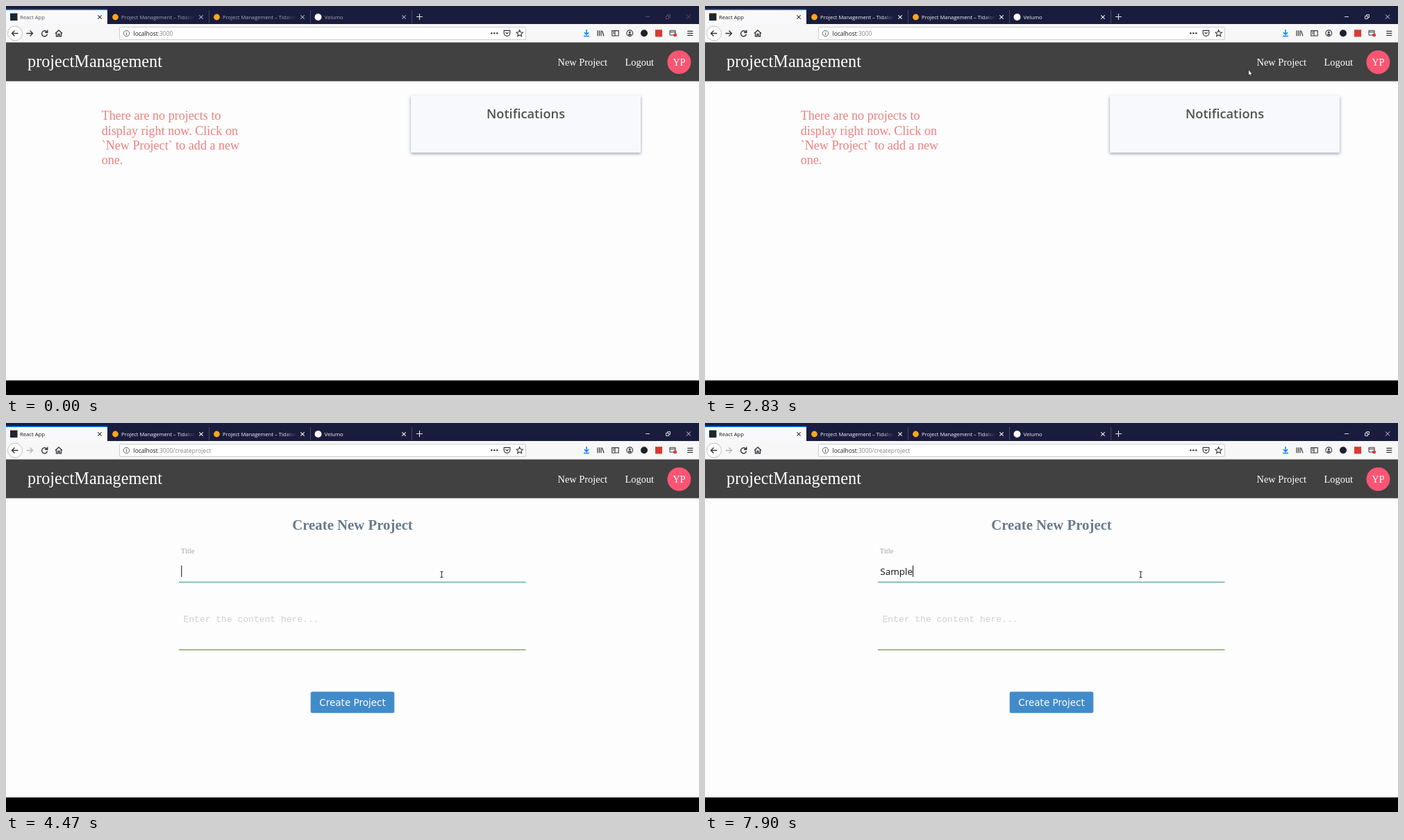
An HTML page with a canvas that plays this animation: 998x561 px, repeating every 8000 ms.

```html
<!DOCTYPE html>
<html lang="en">
<head>
<meta charset="utf-8">
<title>Project management demo</title>
<style>
  html, body { margin: 0; width: 100%; height: 100%; overflow: hidden; background: #000; }
  canvas { display: block; }
</style>
</head>
<body>
<canvas id="stage" width="998" height="561"></canvas>
<script>
const ctx = document.getElementById('stage').getContext('2d');
const LOOP = 8000;
const SERIF = '"Liberation Serif", serif';
const UI = '"Open Sans", sans-serif';
const MONO = '"Liberation Mono", monospace';
const WIDE = '"DejaVu Sans", sans-serif';

// Moments of the story, in ms
const ACTIVATE = 1340, HOVER = 2850, OPEN_FORM = 3240, LEAVE_LINK = 3590, FOCUS = 4100;
const TYPED = [6900, 7070, 7200, 7350, 7590, 7830];
const POINTER = [
  [1340, 640, 238], [1600, 574, 126], [1800, 574, 126], [1970, 406, 125], [2100, 406, 125],
  [2130, 418, 121], [2500, 610, 112], [2900, 818, 87], [3530, 818, 87],
  [3700, 718, 165], [3830, 637.5, 220], [4060, 627.5, 218.5]
];

const clamp = v => Math.max(0, Math.min(1, v));
const mix = (a, b, k) => a + (b - a) * k;
const ease = k => k * k * (3 - 2 * k);

function rect(x, y, w, h, color) {
  ctx.fillStyle = color;
  ctx.fillRect(x, y, w, h);
}

function rounded(x, y, w, h, r, fill, stroke) {
  ctx.beginPath();
  ctx.roundRect(x, y, w, h, r);
  if (fill) { ctx.fillStyle = fill; ctx.fill(); }
  if (stroke) { ctx.strokeStyle = stroke; ctx.lineWidth = 1; ctx.stroke(); }
}

function disc(x, y, r, fill, stroke, width = 1) {
  ctx.beginPath();
  ctx.arc(x, y, r, 0, Math.PI * 2);
  if (fill) { ctx.fillStyle = fill; ctx.fill(); }
  if (stroke) { ctx.strokeStyle = stroke; ctx.lineWidth = width; ctx.stroke(); }
}

function text(str, x, y, size, family, color, weight = 400, align = 'left') {
  ctx.font = `${weight} ${size}px ${family}`;
  ctx.fillStyle = color;
  ctx.textAlign = align;
  ctx.fillText(str, x, y);
  return ctx.measureText(str).width;
}

function stroke(path, x, y, color, width = 1.1) {
  ctx.save();
  ctx.translate(x, y);
  ctx.strokeStyle = color;
  ctx.lineWidth = width;
  ctx.stroke(new Path2D(path));
  ctx.restore();
}

function tabBar(active) {
  const ink = active ? '#f4f4fa' : '#a3a4b4';
  const control = active ? '#e8e8f0' : '#55576e';
  rect(0, 0, 998, 26, '#1a1c3d');
  rect(0, 5, 146, 21, '#f9f9fb');
  rect(0, 4.5, 146, 1.5, '#0a84ff');
  rect(6, 10.5, 10.5, 10.5, '#20262d');
  text('React App', 20, 18.7, 7.7, UI, active ? '#17171c' : '#55555c');
  for (const x of [146, 292]) {
    disc(x + 11.5, 16, 4.4, '#ffa51f');
    ctx.save();
    ctx.beginPath();
    ctx.rect(x, 6, 127, 20);
    ctx.clip();
    const fade = ctx.createLinearGradient(x + 108, 0, x + 127, 0);
    fade.addColorStop(0, ink);
    fade.addColorStop(1, '#1a1c3d');
    text('Project Management – Tidalora', x + 20, 18.7, 7.55, UI, fade);
    ctx.restore();
  }
  disc(449.5, 16, 5, '#ffffff');
  text('Velumo', 458.5, 18.7, 7.7, UI, ink);
  for (const x of [292, 438, 584]) rect(x, 6, 1, 19, '#44465f');
  [135, 281, 427, 573].forEach((x, i) =>
    stroke('M-2.7-2.7L2.7 2.7M2.7-2.7L-2.7 2.7', x, 16, i ? ink : '#333338'));
  stroke('M-4.5 0H4.5M0-4.5V4.5', 595.5, 15.5, '#e4e4ec');
  stroke('M-3 0H3', 924, 15.5, control, 0.9);
  stroke('M-3-1H1V3H-3ZM-1-1V-3H3V1H1', 953.5, 15.5, control, 0.9);
  stroke('M-3-3L3 3M3-3L-3 3', 983, 15.5, control, 0.9);
}

function toolbar(formOpen) {
  const ink = '#38383d';
  const arrow = 'M4.5 0H-4.5M-.5-4L-4.5 0L-.5 4';
  rect(0, 26, 998, 26.5, '#f7f7f8');
  disc(13, 39.5, 10.5, '#fdfdfd', '#bcbcc0', 0.9);
  stroke(arrow, 13, 39.5, ink, 1.4);
  ctx.save();
  ctx.scale(-1, 1);
  stroke(arrow, -34, 39.5, formOpen ? '#b8b8bc' : ink, 1.4);
  ctx.restore();
  stroke('M3.4-2A4 4 0 1 0 4 1M4.3-5V-1.2H.5', 55.5, 39.5, ink, 1.4);
  stroke('M-5 0L0-4.5L5 0M-3.5-1V4.2H-1V1H1V4.2H3.5V-1', 76, 39.5, ink, 1.4);

  rounded(163.5, 30.5, 585, 18, 1.5, '#ffffff', '#cfcfd2');
  disc(173.5, 39.5, 4.2, null, '#55555a', 0.9);
  stroke('M0-2.4V-1.3M0-.5V2.5', 173.5, 39.5, '#55555a', 1);
  const host = text('localhost', 183.5, 42.6, 8.43, UI, '#1a1a1e');
  text(formOpen ? ':3000/createproject' : ':3000', 183.5 + host, 42.6, 8.43, UI, '#85858a');
  for (const x of [699.3, 703.3, 707.3]) disc(x, 39.3, 1.2, ink);
  stroke('M-4.3-3.7H4.3V0A4.3 4.3 0 0 1-4.3 0ZM-2-1L0 1L2-1', 721.5, 39, ink, 1.2);
  stroke('M0-4.7L1.4-1.6L4.7-1.3L2.2 1L3 4.3L0 2.6L-3 4.3L-2.2 1L-4.7-1.3L-1.4-1.6Z', 739.7, 39.4, ink, 1.1);

  stroke('M0-5V2M-3-1L0 2.3L3-1M-4 4.5H4', 836, 39, '#0a84ff', 1.5);
  stroke('M-4-4V4M-1.5-4V4M1-4V4M2.5-3.5L5 4', 856, 39.3, ink, 1.2);
  stroke('M-4.7-3.7H4.7V3.7H-4.7ZM-.5-3.7V3.7M-3.4-1.6H-1.5M-3.4.5H-1.5', 877.5, 39.3, ink, 1.1);
  disc(898.3, 39.3, 4.4, null, ink, 1.1);
  disc(898.3, 38, 1.6, ink);
  rounded(895.9, 40.3, 4.8, 2.2, 1, ink);
  disc(919, 39.3, 5, '#20202a');
  rect(935, 34.2, 10, 10.2, '#d93a32');
  stroke('M-4.5-3.7H3.5V3H-4.5ZM-4.5-1.5H3.5', 960.5, 39, ink, 1);
  disc(963.5, 41.7, 2.5, '#d93a32');
  stroke('M-4-3H4M0 0M-4 0H4M-4 3H4', 985.3, 39.3, ink, 1.2);
}

function siteHeader() {
  rect(0, 52.5, 998, 56, '#414141');
  text('projectManagement', 31, 88.2, 24.25, SERIF, '#ffffff');
  text('New Project', 794.5, 85.8, 14.4, SERIF, '#ffffff');
  text('Logout', 891.5, 85.8, 14.4, SERIF, '#ffffff');
  disc(969.4, 81, 17, '#fb5574');
  text('YP', 969.4, 85.8, 14.4, SERIF, '#ffffff', 400, 'center');
}

function dashboard() {
  ['There are no projects to', 'display right now. Click on', '`New Project` to add a new', 'one.']
    .forEach((line, i) => text(line, 137.7, 164.4 + i * 21.3, 18.1, SERIF, '#ee8080'));
  ctx.save();
  ctx.shadowColor = 'rgba(60, 65, 110, 0.55)';
  ctx.shadowBlur = 4;
  ctx.shadowOffsetY = 1.5;
  rect(583, 129, 331, 82.5, '#f8f9fc');
  ctx.restore();
  text('Notifications', 748.5, 162, 18.3, UI, '#51554e', 600, 'center');
}

function fieldLine(y, color) {
  rect(249, y, 499.5, 1.5, color);
}

function form(t) {
  const k = ease(clamp((t - FOCUS) / 400));
  text('Create New Project', 499, 154, 20.8, SERIF, '#6a7b8b', 700, 'center');
  text('Title', mix(253, 251.8, k), mix(217, 187.6, k), mix(15.4, 10.6, k), SERIF, '#a2a2a6');
  fieldLine(228.8, `rgb(${mix(139, 105, k)}, ${mix(160, 174, k)}, ${mix(116, 164, k)})`);
  text('Enter the content here...', 255.5, 287, 13, MONO, '#d0d0d0');
  fieldLine(326.3, '#8ba074');
  rounded(438.7, 387.5, 120.6, 30.7, 2.5, '#428bca');
  text('Create Project', 499, 408.2, 13.5, WIDE, '#ffffff', 400, 'center');

  const value = 'Sample'.slice(0, TYPED.filter(at => t >= at).length);
  const width = text(value, 252.3, 219.3, 13.5, UI, '#111111');
  const blinkOn = Math.floor((t - 4070) / 533) % 2 === 0;
  if (t >= FOCUS && (value || blinkOn)) rect(252.3 + width, 205.5, 1, 16.5, '#111111');
}

function statusBar() {
  rect(0, 527.5, 103.5, 12.5, '#f0f0f1');
  rect(0, 527, 104, 0.7, '#d0d0d3');
  rect(103.3, 527, 0.7, 13, '#d0d0d3');
  text('localhost:3000/createproject', 2.5, 536.7, 7.4, UI, '#333337');
}

function pointerAt(t) {
  const next = POINTER.findIndex(p => p[0] > t);
  if (next < 0) return POINTER[POINTER.length - 1].slice(1);
  const a = POINTER[next - 1], b = POINTER[next];
  const k = (t - a[0]) / (b[0] - a[0]);
  return [mix(a[1], b[1], k), mix(a[2], b[2], k)];
}

function shape(path, x, y) {
  const p = new Path2D(path);
  ctx.save();
  ctx.translate(x, y);
  ctx.fillStyle = '#ffffff';
  ctx.strokeStyle = '#222222';
  ctx.lineWidth = 0.8;
  ctx.fill(p);
  ctx.stroke(p);
  ctx.restore();
}

function pointer(t) {
  if (t < ACTIVATE) return;
  const [x, y] = pointerAt(t);
  const overField = t > OPEN_FORM && y > 200;
  if (overField) {
    stroke('M-2-4H2M0-4V4M-2 4H2', x, y, '#333333', 1);
  } else if (t >= HOVER && t < LEAVE_LINK) {
    shape('M-1 0Q0-1 1 0V4L4 4.6Q5 5 4.7 7L3.5 10.5H-1.2L-4 6.5Q-3.3 5-1 6.5Z', x, y);
  } else {
    shape('M.5.5V9L2.5 7.2L3.8 10L5.2 9.3L4 6.7H6.3Z', x, y);
  }
}

function draw(now) {
  const t = now % LOOP;
  const formOpen = t >= OPEN_FORM;
  rect(0, 0, 998, 561, '#000000');
  rect(0, 52, 998, 488, '#fdfdfd');
  tabBar(t >= ACTIVATE);
  toolbar(formOpen);
  siteHeader();
  if (formOpen) form(t); else dashboard();
  if (t >= HOVER && t < LEAVE_LINK) statusBar();
  pointer(t);
}

const start = performance.now();
function tick() {
  draw(performance.now() - start);
  requestAnimationFrame(tick);
}
tick();
</script>
</body>
</html>
```
